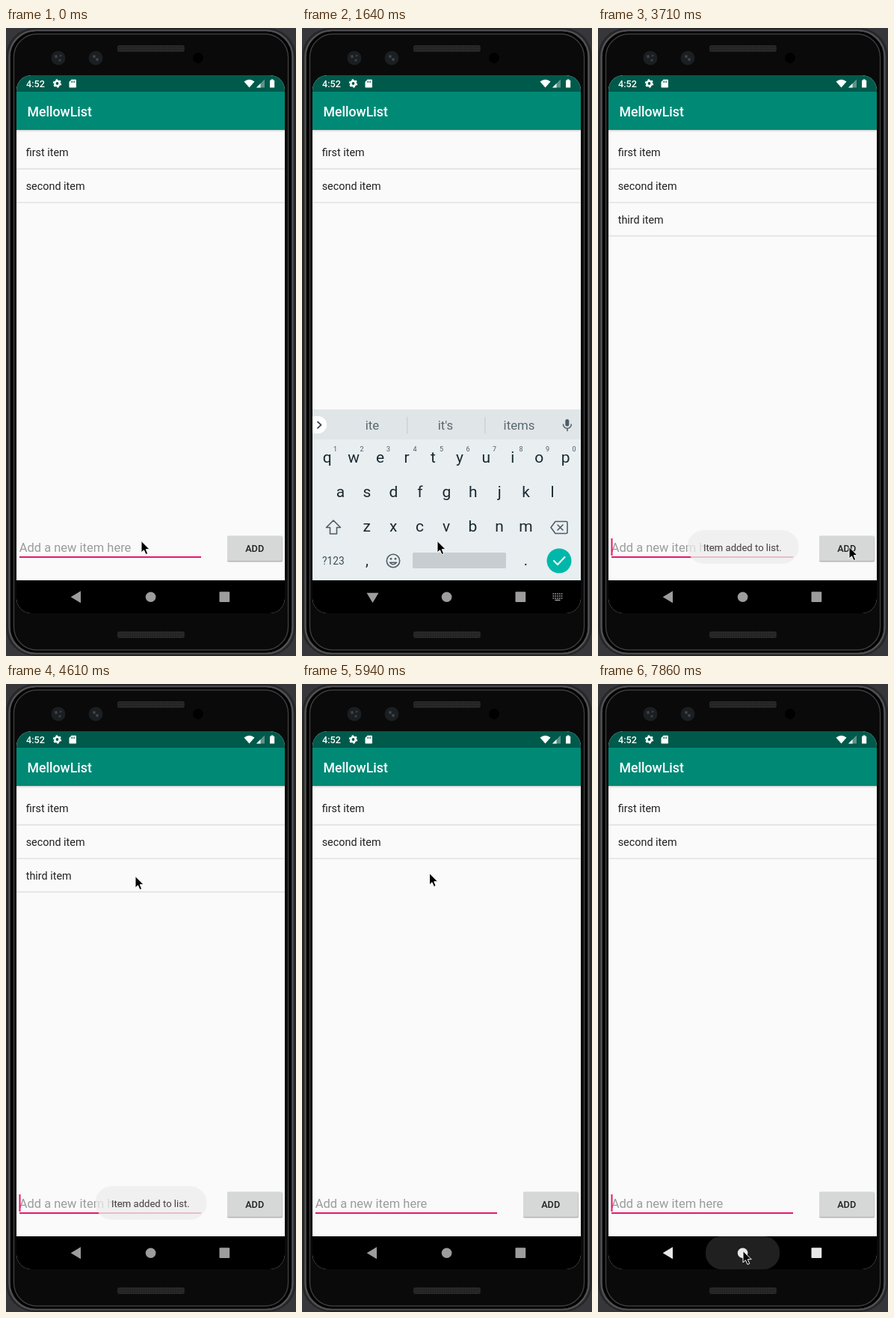
Animation of 388x838 px, one loop 8 s. Source, as an HTML page:

```html
<!DOCTYPE html>
<html lang="en">
<head>
<meta charset="utf-8">
<title>To-do list demo</title>
<style>
  html, body { margin: 0; width: 100%; height: 100%; overflow: hidden; background: #37373b; }
  svg { display: block; width: 100vw; height: 100vh; }
  text { font-family: Roboto, sans-serif; fill: #212121; white-space: pre; }
  .medium { font-weight: 500; }
  .mid { text-anchor: middle; }
  .line { fill: none; stroke-linecap: round; stroke-linejoin: round; }
</style>
</head>
<body>
<svg viewBox="0 0 388 838">
  <defs>
    <clipPath id="screenClip"><rect x="14" y="63" width="359" height="718" rx="20"/></clipPath>
    <clipPath id="rowClip"><rect x="14" y="233" width="359" height="44.5"/></clipPath>
    <pattern id="mesh" width="3" height="3" patternUnits="userSpaceOnUse">
      <rect width="3" height="3" fill="#292929"/><circle cx="1.5" cy="1.5" r=".8" fill="#171717"/>
    </pattern>
    <linearGradient id="barShadow" x2="0" y2="1">
      <stop stop-color="#000" stop-opacity=".16"/><stop offset="1" stop-color="#000" stop-opacity="0"/>
    </linearGradient>
  </defs>

  <!-- Phone body -->
  <rect width="388" height="838" rx="38" fill="#262628"/>
  <rect x="4.5" y="3.5" width="379" height="831" rx="35" fill="#0a0a0a" stroke="#505052" stroke-width="2.6"/>
  <rect x="7.5" y="6" width="373" height="826" rx="33" fill="#0a0a0a" stroke="#000" stroke-width="3"/>
  <rect x="10.5" y="8" width="367" height="822" rx="31" fill="#0a0a0a" stroke="#3c3c3e" stroke-width="1.4"/>
  <rect x="149" y="23" width="90" height="9" rx="3" fill="url(#mesh)"/>
  <rect x="149" y="805" width="90" height="9" rx="3" fill="url(#mesh)"/>
  <g fill="#1b1f22">
    <circle cx="70" cy="40" r="9.5"/><circle cx="120" cy="40" r="9.5"/>
    <circle cx="257" cy="40" r="7" fill="#000"/>
  </g>
  <g fill="#3c444a">
    <circle cx="67" cy="38" r="2"/><circle cx="73" cy="37" r="1.3"/><circle cx="72" cy="43" r="1.6"/>
    <circle cx="118" cy="38" r="2"/><circle cx="122" cy="42" r="2"/>
  </g>

  <g clip-path="url(#screenClip)">
    <rect x="14" y="63" width="359" height="718" fill="#fafafa"/>
    <rect x="14" y="136" width="359" height="3" fill="url(#barShadow)"/>
    <rect x="14" y="85" width="359" height="51" fill="#008975"/>
    <rect x="14" y="63" width="359" height="22" fill="#005a4b"/>
    <text class="medium" x="27" y="79" font-size="12.6" style="fill:#fff">4:52</text>
    <text class="medium" x="28.5" y="118" font-size="17.7" style="fill:#fff">MellowList</text>
    <g fill="#fff">
      <circle cx="68.5" cy="74" r="3.2" fill="none" stroke="#fff" stroke-width="2.6"/>
      <circle cx="68.5" cy="74" r="4.9" fill="none" stroke="#fff" stroke-width="1.6" stroke-dasharray="2.5 2.63"/>
      <path d="M84.5 72l3-3.2h5.6q.9 0 .9.9v8.8q0 .9-.9.9h-7.7q-.9 0-.9-.9z"/>
      <path d="M87.6 70.5v2.5M89.6 70.5v2.5M91.6 70.5v2.5" stroke="#005a4b" stroke-width=".9"/>
      <path d="M318.5 71.5q7-5.5 14 0l-7 8z"/>
      <path d="M346 68.5v11h-11z" opacity=".35"/><path d="M340.5 74v5.5H335z"/>
      <path d="M353 69.7h1.6v-1.2h3v1.2h1.6v9.8H353z"/>
    </g>

    <text x="26.7" y="171" font-size="14.4">first item</text>
    <text x="26.7" y="216" font-size="14.4">second item</text>
    <path d="M14 188H373M14 232.8H373" stroke="#dedede" stroke-width="1.3"/>
    <g id="third">
      <circle id="rowRipple" cx="196.5" cy="255" r="0" fill="#dadada" clip-path="url(#rowClip)"/>
      <path d="M14 277.5H373" stroke="#dedede" stroke-width="1.3"/>
      <text x="26.7" y="261" font-size="14.4">third item</text>
    </g>

    <text id="field" x="17.7" y="698.5" font-size="16.5"></text>
    <rect x="18" y="705" width="243" height="2" fill="#e2196a"/>
    <rect id="caret" y="681" width="2" height="23" fill="#e2196a"/>
    <rect x="296" y="679" width="74" height="34" rx="2" fill="#000" opacity=".13"/>
    <rect x="296" y="678" width="74" height="34" rx="2" fill="#000" opacity=".18"/>
    <rect id="button" x="296" y="677.5" width="73.5" height="33.5" rx="2"/>
    <text class="medium mid" x="332.7" y="698.5" font-size="12.7">ADD</text>

    <g id="toast">
      <rect x="119.5" y="670" width="149" height="45" rx="22.5" fill="#ededed" opacity=".76"/>
      <text x="141" y="697.5" font-size="13.1" style="fill:#3f3f3f">Item added to list.</text>
    </g>

    <rect x="14" y="737" width="359" height="44"/>

    <g id="keyboard">
      <rect x="14" y="509" width="359" height="228" fill="#e9eef1"/>
      <rect x="14" y="509" width="359" height="40" fill="#e0e5e8"/>
      <path d="M14 518h7.5a11.5 11.5 0 0 1 0 23H14z" fill="#fff"/>
      <path class="line" d="M21 525.5l4.5 4.2-4.5 4.2" stroke="#37474f" stroke-width="1.8"/>
      <g id="suggestions"><path d="M140.8 519v22M244.8 519v22" stroke="#c6cdd1" stroke-width="1.2"/></g>
      <rect x="352.3" y="522" width="5" height="9.5" rx="2.5" fill="#4d5d66"/>
      <path class="line" d="M349.5 529a5.4 5.4 0 0 0 10.8 0M355 534.5v3" stroke="#4d5d66" stroke-width="1.5"/>
      <g id="keys"></g>
      <g class="line" stroke="#4d5d66" stroke-width="1.6">
        <path d="M42 657l-9.5 9.5h5V675h9v-8.5h5z"/>
        <path d="M339 658.5h14.5q1.5 0 1.5 1.5v13q0 1.5-1.5 1.5H339l-6-8z"/>
        <path d="M342 663l7 7M349 663l-7 7"/>
        <circle cx="122" cy="711" r="8.7"/>
        <path d="M117.5 713.3q4.5 5 9 0z"/>
      </g>
      <circle cx="119" cy="708.3" r="1.4" fill="#4d5d66"/><circle cx="125" cy="708.3" r="1.4" fill="#4d5d66"/>
      <rect x="148" y="700" width="125" height="21" rx="2" fill="#c7cdd1"/>
      <circle cx="344" cy="711" r="16.5" fill="#00b8a9"/>
      <path class="line" d="M337 711l5 5 9.5-10" stroke="#fff" stroke-width="2"/>
    </g>

    <rect id="homePill" x="144" y="737" width="99" height="44" rx="21" fill="#202020"/>
    <g id="nav">
      <path id="back" d="M86.7 759.3l13.3-8v16z"/>
      <circle cx="193.6" cy="759.3" r="6.8"/>
      <rect x="285.5" y="752.3" width="13.7" height="13.7" rx="1"/>
      <g id="imeIcon">
        <path d="M335.5 755h13M335.5 758h13M335.5 761h13" stroke="#9d9d9d" stroke-width="1.7" stroke-dasharray="1.7 1.1"/>
        <path d="M338.5 763.6h7" stroke="#9d9d9d" stroke-width="1.5"/>
      </g>
    </g>
  </g>

  <path id="pointer" d="M0-.5v15.5l3.5-3.2 2.5 5.7 2.7-1.1-2.4-5.7h4.9z" stroke="#fff" stroke-width="1"/>
</svg>

<script>
const LOOP = 8000, TICK = 148.4;
const $ = id => document.getElementById(id);
const show = (id, on) => $(id).setAttribute('visibility', on ? 'visible' : 'hidden');
const set = (id, attrs) => {
  for (const name in attrs) $(id).setAttribute(name, attrs[name]);
};

function addText(parent, x, y, size, color, content = '') {
  const node = document.createElementNS('http://www.w3.org/2000/svg', 'text');
  node.setAttribute('class', 'mid');
  node.setAttribute('x', x);
  node.setAttribute('y', y);
  node.setAttribute('font-size', size);
  node.style.fill = color;
  node.textContent = content;
  return $(parent).appendChild(node);
}

const keyRows = [['qwertyuiop', 33.7, 580], ['asdfghjkl', 51.5, 626], ['zxcvbnm', 86.7, 672]];
for (const [letters, left, y] of keyRows)
  [...letters].forEach((key, i) => addText('keys', left + i * 35.45, y, 21, '#1a2a31', key));
[...'1234567890'].forEach((digit, i) => addText('keys', 44.5 + i * 35.5, 565, 9, '#4d5d66', digit));
addText('keys', 42, 715.5, 13.8, '#3f4f58', '?123');
addText('keys', 87, 717, 20, '#1a2a31', ',');
addText('keys', 299.5, 717, 20, '#1a2a31', '.');
const slots = [94, 192, 290.5].map(x => addText('suggestions', x, 536, 16.8, '#5a6871'));

// Each entry starts at its tick and holds until the next one.
const words = [
  [0, '', '', ''], [8, 'this', 'the', 'that'], [9, 'third', 'thirst', 'thirdhand'],
  [10, 'item', 'it', 'is'], [11, 'ite', "it's", 'items'], [12, 'item', 'items', 'itemized']
];
const pointerPath = [
  [0, 181, 685], [14, 225, 690], [15, 300, 702], [16, 341, 706], [20, 338, 698], [21, 336, 693],
  [26, 280, 480], [27, 211, 300], [29, 195, 280], [30, 180, 262], [31, 173, 257], [33, 171, 255],
  [34, 170.5, 253], [47, 162, 711], [48, 170, 745], [49, 180, 771], [50, 188, 771], [51, 193, 764],
  [52, 194, 757]
];
const rippleRadius = [[0, 0], [36, 60], [37, 154], [38, 190]];
const toastOpacity = [[0, 0], [24, 0.5], [25, 1], [38, 0.4], [39, 0]];
const held = (steps, tick) => steps.findLast(step => step[0] <= tick).slice(1);

function render(time) {
  const tick = Math.floor((time + 8) / TICK);
  const between = (from, to) => tick >= from && tick < to;

  const typed = between(12, 23);
  $('field').textContent = typed ? 'third item' : 'Add a new item here';
  $('field').style.fill = typed ? '#212121' : '#9b9b9b';
  const blinkOn = Math.floor((tick * 148.5 - 3380) / 500) % 2 === 0;
  set('caret', { x: typed ? 88 : 17.5 });
  show('caret', between(1, 23) || (tick >= 23 && blinkOn));

  show('third', between(23, 39));
  set('rowRipple', { r: held(rippleRadius, tick)[0] });
  set('toast', { opacity: held(toastOpacity, tick)[0] });
  set('button', { fill: tick === 22 ? '#c2c3c3' : '#d6d7d7' });

  const sliding = tick === 1 ? 44 : tick === 18 ? 10 : 0;
  show('keyboard', between(1, 19));
  set('keyboard', { transform: `translate(0 ${sliding})`, opacity: sliding ? 0.8 : 1 });
  const suggested = held(words, tick);
  slots.forEach((slot, i) => { slot.textContent = suggested[i]; });
  set('suggestions', { opacity: suggested[0] ? 1 : 0 });

  const docked = between(1, 18);
  set('back', { transform: docked ? 'rotate(-90 94.5 759.3)' : '' });
  show('imeIcon', docked);
  set('nav', { fill: tick >= 52 ? '#e8e8e8' : '#9d9d9d' });
  show('homePill', tick >= 53);

  const [x, y] = held(pointerPath, tick);
  set('pointer', { transform: `translate(${x} ${y})` });
}

const start = performance.now();
function loop() {
  render((performance.now() - start) % LOOP);
  requestAnimationFrame(loop);
}
loop();
</script>
</body>
</html>
```
